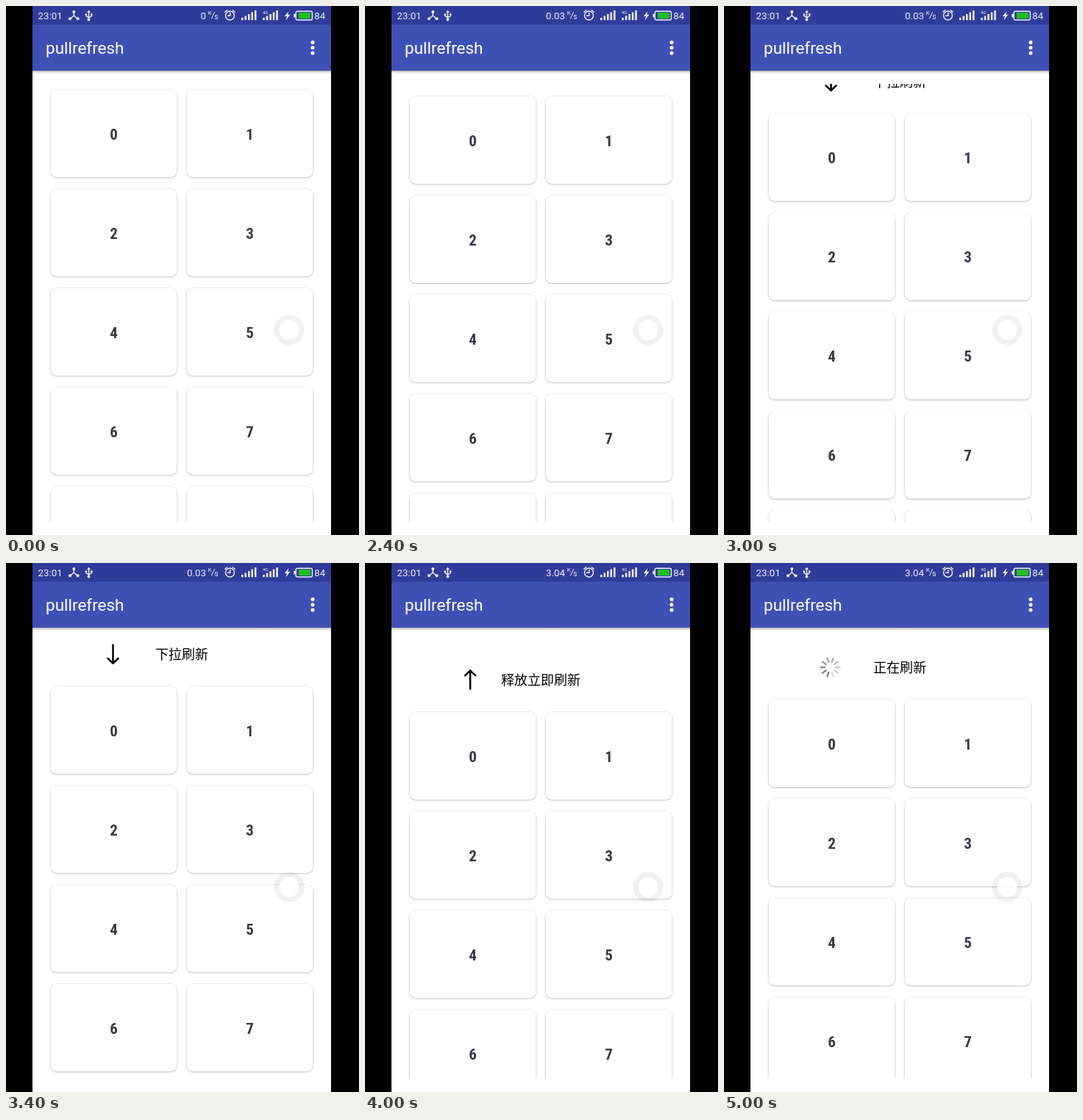
An HTML page for the animation above (5.1 s loop, 480 by 720 pixels).

```html
<!DOCTYPE html>
<html lang="zh-CN">
<head>
<meta charset="utf-8">
<title>pullrefresh</title>
<style>
  html, body { margin: 0; width: 100%; height: 100%; overflow: hidden; background: #000; }
  svg { display: block; width: 480px; height: 720px; }
  text { font-family: Roboto, sans-serif; }
  .status text { font-size: 13.3px; fill: #f1f2fa; }
  .digit { font: bold 21px "Roboto Condensed", Roboto, sans-serif; font-stretch: 75%; fill: #3a3846; text-anchor: middle; }
  .hint { font: 18px "Noto Sans CJK SC", "Noto Sans CJK", "Noto Sans CJK JP", sans-serif; text-anchor: middle; }
  .line { fill: none; stroke: #f1f2fa; stroke-width: 1.4; stroke-linecap: round; stroke-linejoin: round; }
  .solid { fill: #f1f2fa; }
  .card { fill: #fff; filter: drop-shadow(0 0 .6px rgba(0,0,0,.22)) drop-shadow(0 1.4px 1.1px rgba(0,0,0,.24)); }
  .arrow { fill: none; stroke: #000; stroke-width: 2.5; stroke-linecap: round; stroke-linejoin: round; }
</style>
</head>
<body>
<svg viewBox="0 0 480 720">
  <defs>
    <clipPath id="listArea"><rect x="36" y="106" width="406" height="596"/></clipPath>
    <clipPath id="cardArea"><rect x="36" y="88" width="406" height="614"/></clipPath>
    <linearGradient id="barShadow" x2="0" y2="1">
      <stop offset="0" stop-opacity=".32"/>
      <stop offset=".4" stop-opacity=".12"/>
      <stop offset="1" stop-opacity="0"/>
    </linearGradient>
  </defs>
  <rect width="480" height="720"/>
  <rect x="36" width="406" height="720" fill="#fff"/>

  <g clip-path="url(#listArea)">
    <g id="header">
      <path id="arrow" class="arrow" d="M145.5 57.5V82.5M138.5 75.8L145.5 82.7L152.5 75.8"/>
      <g id="spinner"></g>
      <text id="hint" class="hint" x="239" y="77"></text>
    </g>
  </g>
  <g clip-path="url(#cardArea)"><g id="cards"></g></g>

  <rect x="36" y="88" width="406" height="5" fill="url(#barShadow)"/>
  <rect x="36" y="25" width="406" height="63" fill="#3f50b4"/>
  <rect x="36" width="406" height="25.5" fill="#303c9a"/>
  <text x="54" y="65" font-size="22.5" fill="#fff">pullrefresh</text>
  <g fill="#fff">
    <circle cx="417" cy="49.5" r="2.5"/><circle cx="417" cy="56.8" r="2.5"/><circle cx="417" cy="64" r="2.5"/>
  </g>

  <g class="status">
    <text x="43.5" y="17.5">23:01</text>
    <path class="line" stroke-width="2" d="M92.3 8V13L87 17.5M92.3 13L97.5 17.5"/>
    <g class="solid">
      <circle cx="92.3" cy="8" r="2"/><circle cx="87" cy="17.3" r="2"/><circle cx="97.6" cy="17.3" r="2"/>
      <path d="M110.2 9L112.5 5.5L114.8 9Z"/><circle cx="112.5" cy="18.5" r="1.9"/>
      <circle cx="108.9" cy="11.5" r="1.3"/><rect x="115" y="10.2" width="2.5" height="2.5"/>
    </g>
    <path class="line" d="M112.5 8V18M108.9 11.5V13.4L112.5 15.8L116.2 13.8V12"/>
    <text id="speed" x="272" y="17.5" text-anchor="end"></text>
    <text x="274.8" y="12.3" style="font-size:8px">K</text>
    <path class="line" style="stroke-width:1" d="M279.5 17L283.5 8.5"/>
    <text x="283.2" y="18.3" style="font-size:10px">s</text>
    <circle class="line" cx="304.5" cy="13" r="6"/>
    <path class="line" d="M304.8 9.5V13.2H301.5M297.8 8.2L300.6 5.8M311.2 8.2L308.4 5.8"/>
    <g id="signal" class="solid"></g>
    <text x="349" y="11.2" style="font-size:6px">4G</text>
    <path class="solid" d="M384.5 7L378.8 14H382L380.5 19.5L386.4 11.8H383Z"/>
    <rect class="line" x="394.2" y="7.2" width="22.2" height="11.8" rx="2"/>
    <rect class="solid" x="391.3" y="10.8" width="2.4" height="4.6"/>
    <rect x="398" y="9" width="16" height="8.2" fill="#1fc01f"/>
    <text x="419.3" y="17.5">84</text>
  </g>

  <circle cx="385" cy="441" r="17" fill="none" stroke="#000" stroke-opacity=".055" stroke-width="7.2"/>
  <circle cx="385" cy="441" r="13.4" fill="#fff" fill-opacity=".85"/>
</svg>
<script>
const LOOP = 5100, STEP = 100;
const PULL_END = 4300, SETTLE_END = 4700, PEAK = 102, HEADER_HEIGHT = 72;
const TURN_START = 3700, TURN_TIME = 200;
const SPOKES = 10;
// Finger drag as [time, offset] points
const DRAG = [[2300, 0], [2400, 9], [2500, 18], [2600, 24.5], [2800, 29], [3000, 32.5],
  [3100, 36.5], [3400, 54], [3700, 72], [4000, 89], [4200, 101], [PULL_END, PEAK]];

const byId = id => document.getElementById(id);
const clamp01 = x => Math.min(1, Math.max(0, x));
const repeat = (count, draw) => Array.from({ length: count }, (_, i) => draw(i)).join('');

byId('cards').innerHTML = repeat(10, i => {
  const x = 60.5 + (i % 2) * 185, y = 113.5 + Math.floor(i / 2) * 135;
  return `<rect class="card" x="${x}" y="${y}" width="172" height="119.5" rx="8.5"/>
    <text class="digit" x="${x + 86}" y="${y + 68}">${i}</text>`;
});

byId('signal').innerHTML = [320, 349.3].map(left => repeat(5, i => {
  const height = 3.2 + i * 2.5;
  return `<rect x="${left + i * 4.5}" y="${19.2 - height}" width="2.5" height="${height}"/>`;
})).join('');

byId('spinner').innerHTML = repeat(SPOKES, i =>
  `<path d="M144.5 62.8V57" stroke="#777" stroke-width="2.3" stroke-linecap="round"
    opacity="${0.25 + 0.75 * i / (SPOKES - 1)}" transform="rotate(${-(i + 0.5) * 360 / SPOKES} 144.5 70)"/>`);

function offsetAt(t) {
  if (t <= DRAG[0][0]) return 0;
  if (t >= PULL_END) {
    const p = clamp01((t - PULL_END) / (SETTLE_END - PULL_END));
    return HEADER_HEIGHT + (PEAK - HEADER_HEIGHT) * (1 - p) ** 2;
  }
  const i = DRAG.findIndex(([time]) => time > t);
  const [t0, y0] = DRAG[i - 1], [t1, y1] = DRAG[i];
  return y0 + (y1 - y0) * (t - t0) / (t1 - t0);
}

function render(t) {
  const shift = `translate(0 ${offsetAt(t)})`;
  byId('header').setAttribute('transform', shift);
  byId('cards').setAttribute('transform', shift);

  const loading = t > PULL_END;
  byId('hint').textContent = loading ? '正在刷新' : t >= TURN_START ? '释放立即刷新' : '下拉刷新';
  byId('speed').textContent = t < 800 ? '0' : t < 3800 ? '0.03' : '3.04';

  const turn = -180 * clamp01((t - TURN_START) / TURN_TIME);
  byId('arrow').setAttribute('transform', `rotate(${turn} 144.3 70)`);
  byId('arrow').setAttribute('visibility', loading ? 'hidden' : 'visible');
  const spin = 180 + (t - 5000) * 0.36;
  byId('spinner').setAttribute('transform', `rotate(${spin} 144.5 70)`);
  byId('spinner').setAttribute('visibility', loading ? 'visible' : 'hidden');
}

const start = performance.now();
function tick() {
  const t = (performance.now() - start) % LOOP;
  render(Math.floor(t / STEP) * STEP);
  requestAnimationFrame(tick);
}
tick();
</script>
</body>
</html>
```
